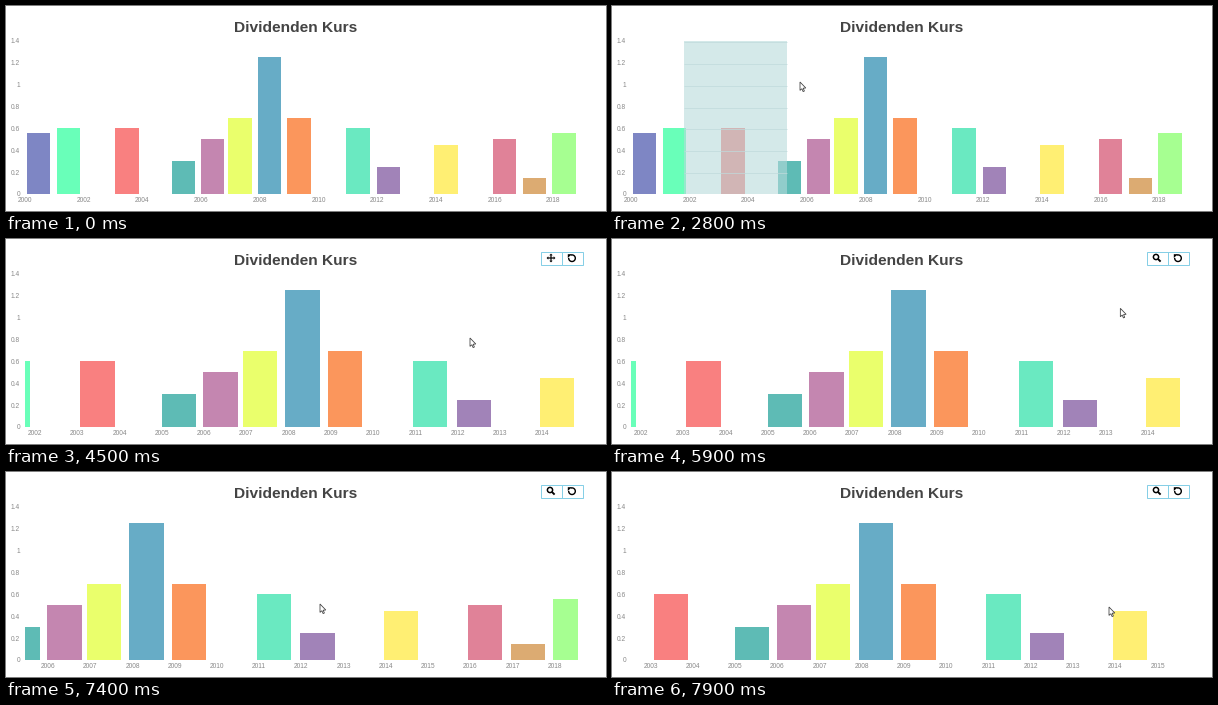
Recreate the animation shown at these times as a matplotlib script. Size 600 px wide and 205 px high, loop 8000 ms.

```python
import numpy as np
import matplotlib.pyplot as plt
from matplotlib.animation import FuncAnimation
from matplotlib.patches import Arc, Circle, Polygon, Rectangle

W, H, DPI = 600, 205, 80
PX = 72 / DPI
STEP, FRAMES = 100, 80

LEFT, RIGHT, TOP, BASE = 19, 572, 35, 188
UNIT = (BASE - TOP) / 1.4
FULL = (0.0, 18.84)
SPAN = 13.09
SELECT_FROM = 72

# position in years after 2000, value, colour
BARS = [
    (0.46, 0.56, "#7e86c4"), (1.48, 0.60, "#69ffb9"), (3.475, 0.60, "#f98080"),
    (5.40, 0.30, "#5ebbb5"), (6.39, 0.50, "#c486b0"), (7.32, 0.70, "#eaff6c"),
    (8.33, 1.25, "#67acc6"), (9.34, 0.70, "#fb965c"), (11.35, 0.60, "#6ae9c1"),
    (12.38, 0.25, "#a183b8"), (14.35, 0.45, "#ffef73"), (16.34, 0.50, "#e08298"),
    (17.36, 0.15, "#dcab72"), (18.37, 0.56, "#a6ff91"),
]

# time, x, y of the pointer
POINTER = np.array([
    (1600, 560, 180), (1900, 390, 130), (2200, 140, 75), (2400, 72, 62),
    (2500, 76, 63), (2800, 188, 76), (3100, 325, 90), (3400, 444, 101),
    (3600, 457, 103), (3900, 464, 99), (4500, 464, 99), (4900, 512, 52),
    (5200, 543, 20), (5300, 545, 18), (5700, 545, 18), (6000, 490, 95),
    (6200, 470, 122), (6500, 409, 126), (6900, 340, 130), (7200, 307, 132),
    (7400, 314, 132), (7500, 335, 133), (7700, 425, 134), (7900, 497, 135),
])
# time, first year shown while panning
PAN = np.array([
    (6200, 1.76), (6500, 3.195), (6900, 4.9), (7200, 5.62),
    (7400, 5.456), (7500, 5.25), (7700, 4.0), (7900, 2.533),
])

SELECT_ON, ZOOM, CLICK = 2500, 3800, 5400
MOVE_ON, MOVE_OFF = 6000, 6800

fig = plt.figure(figsize=(W / DPI, H / DPI), dpi=DPI, facecolor="white")
ax = fig.add_axes([0, 0, 1, 1])
ax.set(xlim=(0, W), ylim=(H, 0))
ax.axis("off")

live = []


def add(patch):
    live.append(ax.add_patch(patch))
    return patch


def line(xs, ys, color, width, z=2):
    live.extend(ax.plot(xs, ys, color=color, lw=width * PX, zorder=z,
                        solid_capstyle="butt"))


def label(x, y, text, ha="center"):
    return ax.text(x, y, text, ha=ha, va="center_baseline", color="#8a8a8a",
                   family="Liberation Sans", size=6.7 * PX)


def pointer_at(t):
    times, xs, ys = POINTER.T
    return np.interp(t, times, xs), np.interp(t, times, ys)


def view(t):
    if t < ZOOM:
        return FULL
    lo = np.interp(t, *PAN.T)
    return lo, lo + SPAN


def draw_chart(t):
    lo, hi = view(t)
    scale = (RIGHT - LEFT) / (hi - lo)
    zoomed = t >= ZOOM
    half = 17.1 if zoomed else 11.8
    for year, value, color in BARS:
        mid = LEFT + (year - lo) * scale
        a, b = max(mid - half, LEFT), min(mid + half, RIGHT)
        if b > a:
            add(Rectangle((a, BASE - value * UNIT), b - a, value * UNIT,
                          fc=color, lw=0))
    for year in range(0, 19, 1 if zoomed else 2):
        if lo <= year <= hi:
            live.append(label(LEFT + (year - lo) * scale, 194, str(2000 + year)))


def draw_selection(t):
    right = max(pointer_at(t - 35)[0], SELECT_FROM + 1)
    add(Rectangle((SELECT_FROM, TOP), right - SELECT_FROM, BASE - TOP,
                  fc="#b6dbdb", alpha=0.59, lw=0, zorder=2))
    for k in range(1, 8):
        y = round(BASE - 0.2 * k * UNIT) + 0.5
        line([SELECT_FROM, right], [y, y], "#bfdadc", 0.7, 3)


def cross_shape(x, y, r, head, stem):
    """Outline of a four-headed arrow."""
    arm = [(-stem, -stem), (-stem, head - r), (-head, head - r), (0, -r),
           (head, head - r), (stem, head - r)]
    pts = []
    for k in range(4):
        c, s = (1, 0, -1, 0)[k], (0, 1, 0, -1)[k]
        pts += [(x + c * u - s * v, y + s * u + c * v) for u, v in arm]
    return pts


def draw_toolbar(t):
    px, py = pointer_at(t)
    hover = 534 <= px <= 556 and 12 <= py <= 26
    if hover:
        add(Rectangle((534.5, 12.5), 21, 13, fc="#2196f3", lw=0, zorder=4))
    add(Rectangle((534.5, 12.5), 42, 13, fill=False, ec="#86cfe6",
                  lw=PX, zorder=5))
    line([555.5, 555.5], [12.5, 25.5], "#86cfe6", 1, 5)

    ink = "white" if hover else "black"
    if t < CLICK:
        add(Polygon(cross_shape(545, 19, 4.4, 1.7, 0.6), fc=ink, lw=0, zorder=6))
    else:
        add(Circle((544, 18), 2.6, fill=False, ec=ink, lw=1.5 * PX, zorder=6))
        line([545.9, 548.6], [19.9, 22.6], ink, 1.9, 6)
    add(Arc((566, 19.2), 6.6, 6.6, theta1=-115, theta2=185, ec="black",
            lw=1.4 * PX, zorder=6))
    add(Polygon([(561.8, 15.2), (565.8, 15.2), (561.8, 19)], fc="black",
                lw=0, zorder=6))


def draw_pointer(t):
    x, y = pointer_at(t)
    if MOVE_ON <= t < MOVE_OFF:
        shape = cross_shape(x, y, 5.4, 2.3, 0.9)
    else:
        arrow = [(0, 0), (0, 8.4), (1.9, 6.7), (3.1, 9.6), (4.4, 9),
                 (3.2, 6.2), (5.8, 6)]
        shape = [(x + u, y + v) for u, v in arrow]
    add(Polygon(shape, fc="white", ec="#404040", lw=0.8 * PX, zorder=9))


def draw(i):
    t = i * STEP
    while live:
        live.pop().remove()
    draw_chart(t)
    if SELECT_ON <= t < ZOOM:
        draw_selection(t)
    if t >= ZOOM:
        draw_toolbar(t)
    if t >= POINTER[0, 0]:
        draw_pointer(t)
    return live


ax.text(289.5, 26, "Dividenden Kurs", ha="center", va="baseline",
        color="#444444", family="Liberation Sans", weight="bold",
        size=15.5 * PX)
for k in range(8):
    label(14, BASE - 0.2 * k * UNIT, f"{0.2 * k:.1f}".replace(".0", ""), "right")

anim = FuncAnimation(fig, draw, frames=FRAMES, init_func=lambda: draw(0),
                     interval=STEP, repeat=True, repeat_delay=0, blit=False)
plt.show()
```
